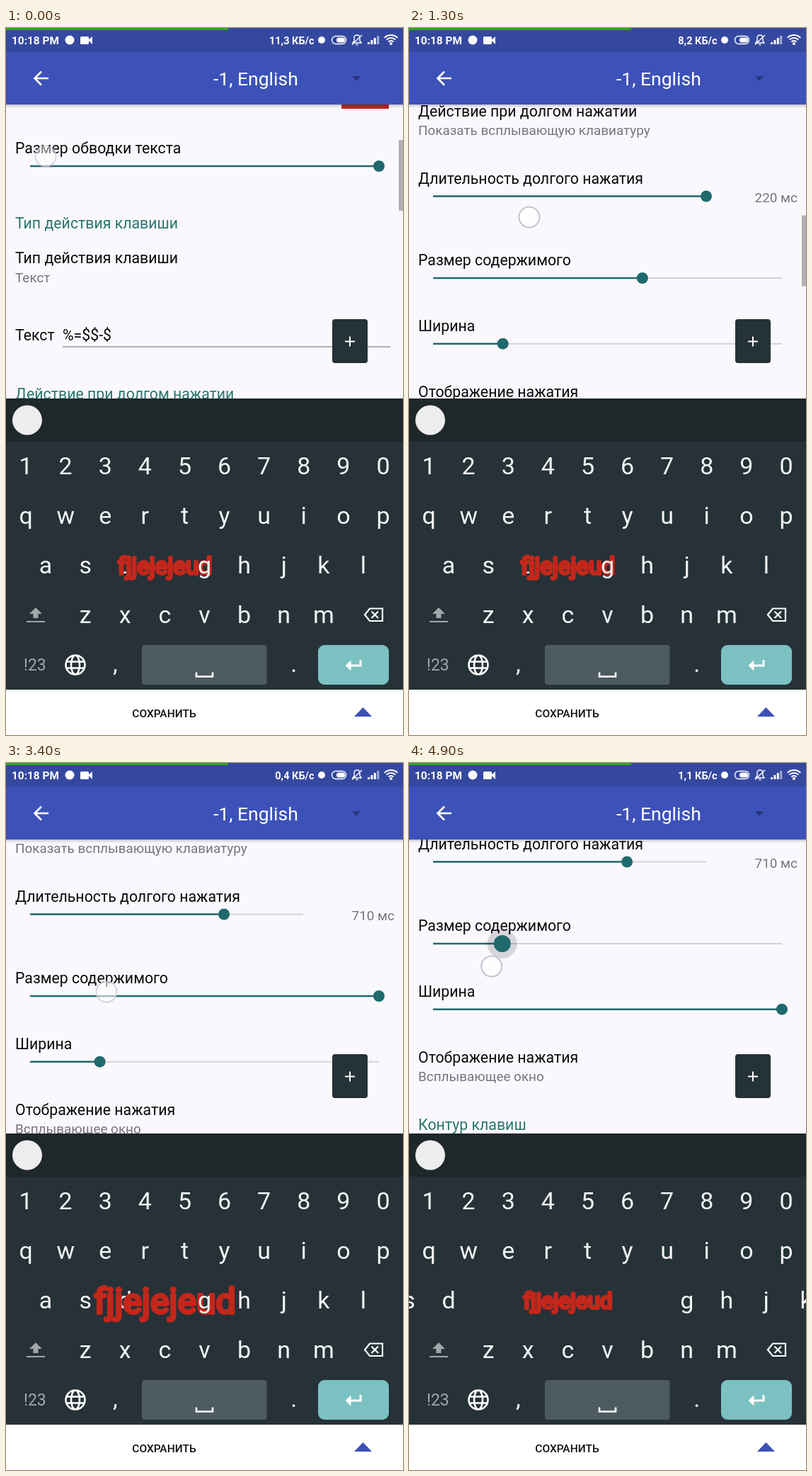
An HTML page with a canvas for the animation above (5 s loop, 561 px wide and 998 px high).

```html
<!DOCTYPE html>
<html lang="ru">
<head>
<meta charset="utf-8">
<title>Key settings</title>
<style>
html, body { margin: 0; width: 100%; height: 100%; overflow: hidden; background: #faf8fc; }
canvas { display: block; }
</style>
</head>
<body>
<canvas id="stage" width="561" height="998"></canvas>
<script>
const g = document.getElementById('stage').getContext('2d');
const LOOP = 5000, STEP = 100, KEY = 56.1;
const TEAL = '#2a7570', SLIDER = '#20696d', GRAY = '#77757a', RED = '#c3271b', INK = '#0b0a0c';

const ramp = (t, a, b) => Math.min(1, Math.max(0, (t - a) / (b - a)));
const ease = (t, a, b) => ramp(t, a, b) ** 2 * (3 - 2 * ramp(t, a, b));
const held = (t, a, b) => Math.min(ramp(t, a - 100, a), 1 - ramp(t, b, b + 100));
const thumbX = (part, end = 527) => 34 + part * (end - 34);

// Everything that moves, as a function of time
function pose(t) {
  const delay = 1 - .29 * ease(t, 1700, 1900);
  const content = .6 + .4 * ease(t, 2550, 3150) - ease(t, 4650, 5000);
  const width = .2 + .8 * ease(t, 4200, 4570);
  return {
    delay, content, width,
    scroll: -413 * (1 - ease(t, 0, 500)) + 60 * ramp(t, 1000, 1500) + 74 * ramp(t, 3430, 3750),
    bar: 1 - ramp(t, 1700, 2000) + ramp(t, 3400, 3500) - ramp(t, 3950, 4150),
    ms: t < 1700 ? 220 : Math.round(delay * 100) * 10,
    rate: ['11,3', '8,2', '0,4', '1,1'][Math.floor(t / LOOP * 4)],
    size: 8 + 42 * content + 17 * Math.sqrt(width - .2),
    push: (width * 280.5 - KEY) / 2
  };
}

function rect(x, y, w, h, color, r = 0) {
  g.fillStyle = color;
  g.beginPath();
  g.roundRect(x, y, w, h, r);
  g.fill();
}
function dot(x, y, r, color) {
  g.fillStyle = color;
  g.beginPath();
  g.arc(x, y, r, 0, 7);
  g.fill();
}
function text(s, x, y, size, color, align = 'left', weight = 400) {
  g.font = `${weight} ${size}px Roboto, sans-serif`;
  g.textAlign = align;
  g.fillStyle = color;
  g.fillText(s, x, y);
}
function line(d, w = 2, color = '#fff') {
  g.strokeStyle = color;
  g.lineWidth = w;
  g.stroke(new Path2D(d));
}
function shape(d, color = '#fff') {
  g.fillStyle = color;
  g.fill(new Path2D(d));
}
const label = (s, y, color = INK) => text(s, 13, y + 7, 21.3, color);
const note = (s, y) => text(s, 13, y + 6, 18.9, GRAY);

function slider(y, part, pressed = 0, end = 527) {
  const x = thumbX(part, end);
  rect(34, y - 1, end - 34, 2, '#d4d1d5');
  rect(34, y - 1.2, x - 34, 2.4, SLIDER);
  dot(x, y, 21, `rgba(0,0,0,${.14 * pressed})`);
  dot(x, y, 8 + 4 * pressed, SLIDER);
}

function settings(t, p) {
  g.save();
  g.beginPath();
  g.rect(0, 107, 561, 416);
  g.clip();
  rect(0, 107, 561, 416, '#faf8fc');
  g.translate(0, -p.scroll);

  label('Цвет текста', -318);
  rect(474, -340, 67, 41, '#bd2420');
  label('Размер обводки текста', -243);
  slider(-218, 1);
  label('Тип действия клавиши', -137, TEAL);
  label('Тип действия клавиши', -88);
  note('Текст', -60);
  label('Текст', 21);
  text('%=$$-$', 80, 28, 21.3, INK);
  rect(80, 36.3, 463, 1.4, '#9c959c');

  label('Действие при долгом нажатии', 104, TEAL);
  label('Действие при долгом нажатии', 154);
  note('Показать всплывающую клавиатуру', 181);
  label('Длительность долгого нажатия', 249);
  slider(273.5, p.delay, held(t, 1700, 1950), 420);
  text(p.ms + ' мс', 549, 282, 18.9, GRAY, 'right');
  label('Размер содержимого', 364);
  slider(389, p.content, held(t, 2550, 3200) + held(t, 4700, LOOP));
  label('Ширина', 457);
  slider(481.7, p.width, held(t, 4200, 4600));
  label('Отображение нажатия', 549.5);
  note('Всплывающее окно', 577);
  label('Контур клавиш', 644.5, TEAL);
  g.restore();

  g.globalAlpha = p.bar;
  rect(555, 256 + p.scroll * .237, 6, 100, '#b3b0b2');
  g.globalAlpha = 1;
  rect(461, 411, 50, 62, '#253238', 4);
  line('M479 442.5h14M486 435.5v14');
}

function header(p) {
  const shade = g.createLinearGradient(0, 108, 0, 113);
  shade.addColorStop(0, 'rgba(0,0,30,.2)');
  shade.addColorStop(1, 'rgba(0,0,30,0)');
  rect(0, 108, 561, 5, shade);
  rect(0, 0, 561, 34, '#35489f');
  rect(0, 34, 561, 74, '#3d52b8');
  rect(0, 0, 314, 3, '#2fa61e');

  text('10:18 PM', 8, 23, 15.4, '#fff', 'left', 700);
  dot(90, 17, 6.5, '#fff');
  rect(105, 12, 12, 11, '#fff', 1.5);
  shape('M116 17l6-5v11z');
  text(p.rate + ' КБ/с', 435.5, 23, 14.5, '#fff', 'right', 700);
  dot(446, 17, 5, '#fff');

  line('M466 11.5h9a5.5 5.5 0 0 1 0 11h-9a5.5 5.5 0 0 1 0-11z', 1.4);
  rect(467, 13.5, 12, 7, '#fff', 3.5);
  line('M490 21h12l-2-3v-4q0-4-4-4t-4 4v4zM494.5 23.5h3M489 23.5L503 10', 1.4);
  for (let i = 0; i < 4; i++)
    rect(511 + i * 4.4, 20 - i * 3, 3, 3 + i * 3, i < 3 ? '#fff' : 'rgba(255,255,255,.55)');
  for (let r = 5; r < 14; r += 4) {
    g.lineWidth = 2;
    g.beginPath();
    g.arc(544, 23, r, -2.36, -.78);
    g.stroke();
  }
  dot(544, 22, 2, '#fff');

  line('M60 71H41M50 61.5L40.5 71L50 80.5', 2.6);
  text('-1, English', 293, 81, 26.5, '#fff');
  shape('M489 68h12l-6 7z', '#28357c');
}

// A run of keys; the column is counted in key widths from the left edge
const keys = (s, column, y, push = 0) => [...s].forEach((c, i) =>
  text(c, KEY * (column + i) + push, y, 34, '#f4f6f6', 'center'));

function keyboard(p) {
  rect(0, 523, 561, 61, '#1e272a');
  rect(0, 584, 561, 350, '#263238');
  dot(30, 553.5, 21, '#ededed');
  keys('1234567890', .5, 630);
  keys('qwertyuiop', .5, 700);

  // The wide key pushes its neighbours apart
  keys('asd', 1, 770, -p.push);
  const word = ['fjjejejeud', 4 * KEY, 759 + p.size * .35];
  text(...word, p.size, RED, 'center');
  g.strokeStyle = RED;
  g.lineWidth = 4;
  g.lineJoin = 'round';
  g.strokeText(...word);
  g.lineJoin = 'miter';
  keys('ghjkl', 5, 770, p.push);
  keys('zxcvbnm', 2, 840);

  shape('M42 818l9 9h-5.5v6h-7v-6h-5.5zM29 837h26v2h-26z', '#a0a6a9');
  line('M514 819.5h18V837h-18l-7-8.7zM516.5 823.5l9.5 9.5m0-9.5l-9.5 9.5', 2.2);
  text('!23', 25, 907, 23, '#a0a6a9');
  line('M84.5 899a13.5 13.5 0 1 0 27 0a13.5 13.5 0 1 0-27 0M92 899a6 13.5 0 1 0 12 0a6 13.5 0 1 0-12 0M86 894.5h24M86 903.5h24', 2.6);
  keys(',', 2.75, 909);
  keys('.', 7.25, 909);
  rect(192, 871, 176.5, 56, '#4d5a60', 4);
  line('M269 909.5v6h23v-6', 2.6);
  rect(441, 871, 100, 56, '#7cc1c2', 9);
  line('M501 892v8h-17', 3);
  shape('M479.5 900l8-7.5v15z');

  rect(0, 934, 561, 64, '#fff');
  text('СОХРАНИТЬ', 223.5, 973, 15.5, '#111', 'center', 500);
  shape('M492 972l12.5-13l12.5 13z', '#3d50b8');
}

function finger(alpha, x, y) {
  g.globalAlpha = alpha;
  dot(x, y, 15, 'rgba(255,255,255,.8)');
  g.strokeStyle = '#c6c2d0';
  g.lineWidth = 2;
  g.beginPath();
  g.arc(x, y, 14.5, 0, 7);
  g.stroke();
  g.globalAlpha = 1;
}

// Swipes follow the scroll, drags follow their slider
function fingers(t, p) {
  finger(held(t, -200, -40), 56, 181);
  finger(held(t, 200, 600), 88, 270 - p.scroll / 2);
  finger(held(t, 1000, 1500), 170, 303 - p.scroll);
  finger(held(t, 1700, 1900), thumbX(p.delay, 420), 214);
  finger(held(t, 2550, 3150), thumbX(p.content), 329);
  finger(held(t, 3430, 3750), 142, 383 - p.scroll);
  finger(held(t, 4200, 4570), thumbX(p.width) + 42, 451);
  finger(held(t, 4700, LOOP), thumbX(p.content) - 15, 287);
}

function draw() {
  const t = Math.floor(performance.now() % LOOP / STEP) * STEP;
  const p = pose(t);
  settings(t, p);
  header(p);
  keyboard(p);
  fingers(t, p);
  requestAnimationFrame(draw);
}
draw();
</script>
</body>
</html>
```
